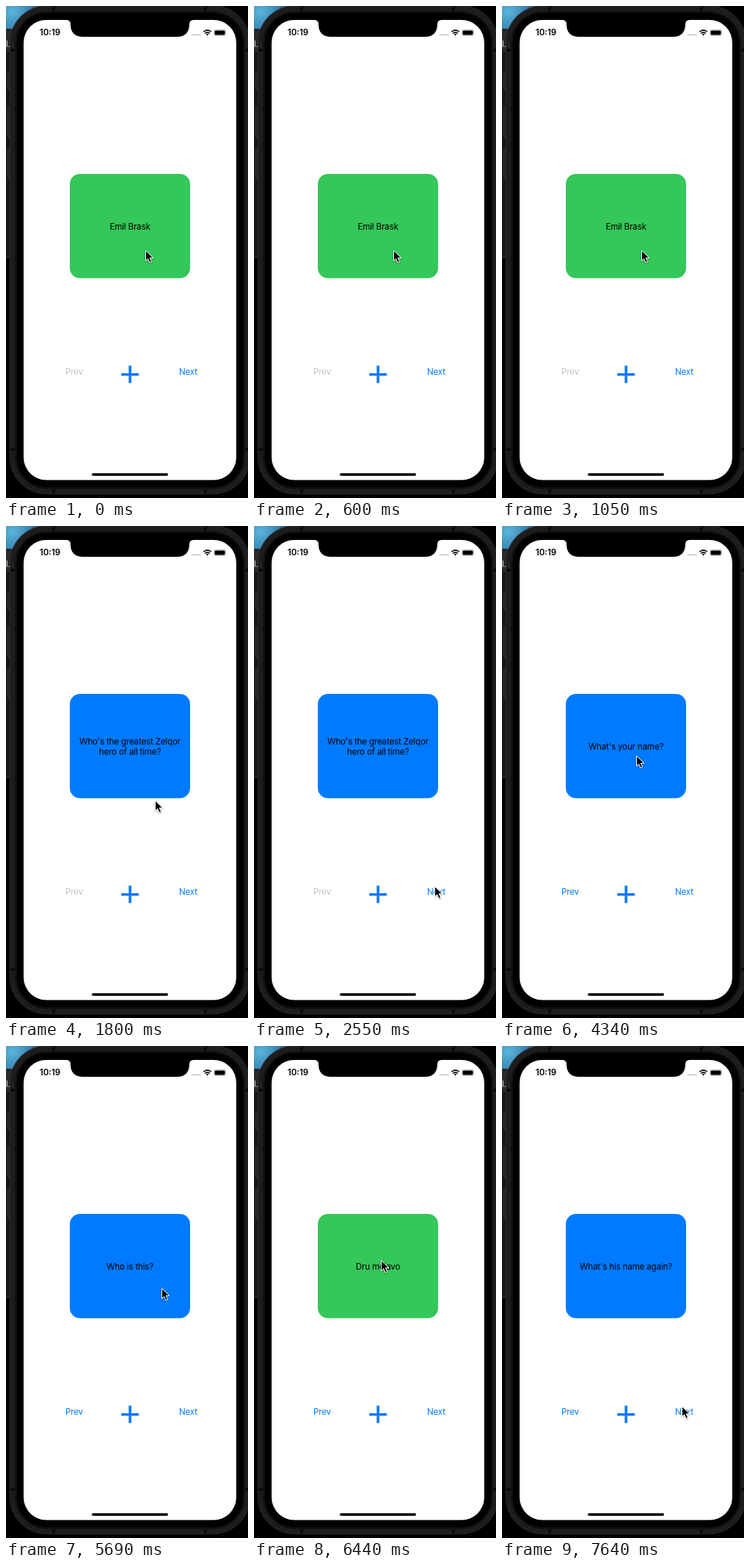
Animation of 330 by 671 pixels, one loop 8 s. Source, as an HTML page:

```html
<!DOCTYPE html>
<html lang="en">
<head>
<meta charset="utf-8">
<title>Flash cards</title>
<style>
  html, body { margin: 0; width: 100%; height: 100%; overflow: hidden; background: #000; }
  svg { display: block; width: 330px; height: 671px; }
  text { font: 400 11.7px Inter, Roboto, sans-serif; letter-spacing: -0.22px; }
  .mid { text-anchor: middle; }
  .clock { font-weight: 600; font-size: 11.5px; letter-spacing: 0; }
</style>
</head>
<body>
<svg viewBox="0 0 330 671">
  <defs>
    <radialGradient id="sky" gradientUnits="userSpaceOnUse" cx="8" cy="8" r="48">
      <stop offset="0" stop-color="#5cb4dc"/>
      <stop offset=".5" stop-color="#3489b4"/>
      <stop offset="1" stop-color="#0a2433"/>
    </radialGradient>
    <filter id="shade" x="-50%" y="-50%" width="200%" height="200%">
      <feDropShadow dx="0" dy="1" stdDeviation="0.9" flood-opacity=".4"/>
    </filter>
  </defs>

  <!-- desktop behind the phone -->
  <rect width="330" height="671"/>
  <rect width="60" height="31" fill="url(#sky)"/>
  <rect y="31" width="30" height="312" fill="#171717"/>
  <rect y="31" width="30" height="32" fill="#292929"/>
  <rect y="342.5" width="30" height="1" fill="#444"/>
  <text x="0" y="56" fill="#ccc">l.</text>

  <!-- phone body -->
  <g fill="#222" stroke="#3a3a3a" stroke-width=".8">
    <rect x="2.4" y="92" width="6" height="22" rx="1.5"/>
    <rect x="2.4" y="137" width="6" height="42" rx="1.5"/>
    <rect x="2.4" y="193" width="6" height="42" rx="1.5"/>
  </g>
  <rect x="5.4" y="-.4" width="327.2" height="665.8" rx="50" fill="#1d1d1d" stroke="#323232" stroke-width=".8"/>
  <rect x="12" y="7" width="314" height="652" rx="44" fill="#111"/>
  <rect x="14.5" y="9.5" width="309" height="647" rx="41"/>
  <g fill="#0a0a0a">
    <rect x="63" y="1" width="4" height="6"/>
    <rect x="270" y="1" width="4" height="6"/>
    <rect x="63" y="659" width="4" height="6"/>
    <rect x="270" y="659" width="4" height="6"/>
    <rect x="6" y="58" width="6" height="4"/>
    <rect x="6" y="603" width="6" height="4"/>
    <rect x="326" y="58" width="4" height="4"/>
    <rect x="326" y="603" width="4" height="4"/>
  </g>
  <rect x="24" y="19" width="290" height="627.5" rx="31" fill="#fff"/>
  <path d="M82 18.5H256V19Q250 19 250 25C250 36 244 42 233 42H105C94 42 88 36 88 25Q88 19 82 19Z"/>

  <!-- status bar -->
  <text class="clock" x="45.8" y="40.3">10:19</text>
  <g fill="#c4c4c6">
    <rect x="252.8" y="38" width="2.5" height="2.4" rx=".8"/>
    <rect x="256.3" y="38" width="2.5" height="2.4" rx=".8"/>
    <rect x="259.8" y="38" width="2.5" height="2.4" rx=".8"/>
    <rect x="263.3" y="38" width="2.5" height="2.4" rx=".8"/>
  </g>
  <g fill="none" stroke="#000" stroke-width="1.6">
    <path d="M269.4 35.2Q274.6 30.6 279.8 35.2"/>
    <path d="M271.4 37.3Q274.6 34.6 277.8 37.3"/>
  </g>
  <path d="M272.8 38.5Q274.6 37.2 276.4 38.5L274.6 40.4Z"/>
  <rect x="283.6" y="32.6" width="16" height="7.8" rx="2.2" fill="none" stroke="#999" stroke-width=".7"/>
  <rect x="284.6" y="33.6" width="14" height="5.8" rx="1.3"/>
  <path d="M300.6 35.2Q301.8 36.5 300.6 37.8Z" fill="#999"/>

  <!-- app -->
  <rect id="card" x="87" y="229" width="164" height="142.3" rx="14"/>
  <text id="line1" class="mid" x="169"/>
  <text id="line2" class="mid" x="169" y="311.6"/>
  <text id="prev" class="mid" x="93" y="503.3">Prev</text>
  <text class="mid" x="248.4" y="503.3" fill="#007aff">Next</text>
  <path d="M157.2 502.4H181M169.1 490.6V514.2" stroke="#007aff" stroke-width="3.5"/>
  <rect x="117" y="637.2" width="104" height="3.6" rx="1.8"/>
  <path id="cursor" filter="url(#shade)" stroke="#fff" stroke-width="1" stroke-linejoin="round"
    d="M.5 .5V14.6L3.7 11.6L6 17L8.6 15.9L6.3 10.6H10.8Z"/>
</svg>
<script>
const LOOP = 8000, BLUE = '#007aff', GREEN = '#34c759', GREY = '#c4c4c6';

const cards = [
  { ask: ["Who's the greatest Zelqor", 'hero of all time?'], answer: 'Emil Brask' },
  { ask: ["What's your name?"], answer: 'No idea' },
  { ask: ['Who is this?'], answer: 'Dru melavo' },
  { ask: ["What's his name again?"], answer: 'No idea' }
];

// Each step changes only what it names: pointer, card or flipped side.
const steps = [
  [0, { at: [190, 333], card: 0, flip: true }],
  [150, { flip: false }],
  [600, { flip: true }],
  [900, { flip: false }],
  [1050, { flip: true }],
  [1350, { flip: false }],
  [1500, { at: [192, 336] }],
  [1650, { at: [197, 350] }],
  [1800, { at: [203, 374] }],
  [1950, { at: [208, 404] }],
  [2100, { at: [232, 455] }],
  [2250, { at: [249, 486] }],
  [2400, { at: [247, 490] }],
  [2550, { at: [246, 491] }],
  [2700, { card: 1 }],
  [3000, { at: [238, 440] }],
  [3150, { at: [207, 352] }],
  [3300, { at: [183, 313] }],
  [3440, { flip: true }],
  [3590, { flip: false }],
  [4040, { flip: true }],
  [4340, { flip: false }],
  [4790, { at: [202, 362] }],
  [4940, { at: [246, 470] }],
  [5090, { at: [275, 564] }],
  [5240, { at: [251, 494] }],
  [5390, { card: 2 }],
  [5690, { at: [212, 330] }],
  [5840, { at: [171, 205] }],
  [6140, { at: [172, 258] }],
  [6290, { at: [173, 292] }],
  [6440, { flip: true }],
  [6590, { flip: false }],
  [6890, { at: [186, 336] }],
  [7040, { at: [218, 418] }],
  [7190, { at: [241, 480] }],
  [7340, { at: [245, 491] }],
  [7640, { card: 3 }]
];

const el = id => document.getElementById(id);
const [box, line1, line2, prev, cursor] = ['card', 'line1', 'line2', 'prev', 'cursor'].map(el);

function stateAt(t) {
  const state = {};
  for (const [start, change] of steps) {
    if (start > t) break;
    Object.assign(state, change);
  }
  return state;
}

function draw(t) {
  const { at, card, flip } = stateAt(t);
  const lines = flip ? [cards[card].answer] : cards[card].ask;
  box.setAttribute('fill', flip ? GREEN : BLUE);
  line1.textContent = lines[0];
  line2.textContent = lines[1] || '';
  line1.setAttribute('y', lines.length > 1 ? 297.6 : 304.5);
  prev.setAttribute('fill', card ? BLUE : GREY);
  cursor.setAttribute('transform', `translate(${at})`);
}

const begin = performance.now();
function tick() {
  draw((performance.now() - begin) % LOOP);
  requestAnimationFrame(tick);
}
tick();
</script>
</body>
</html>
```
